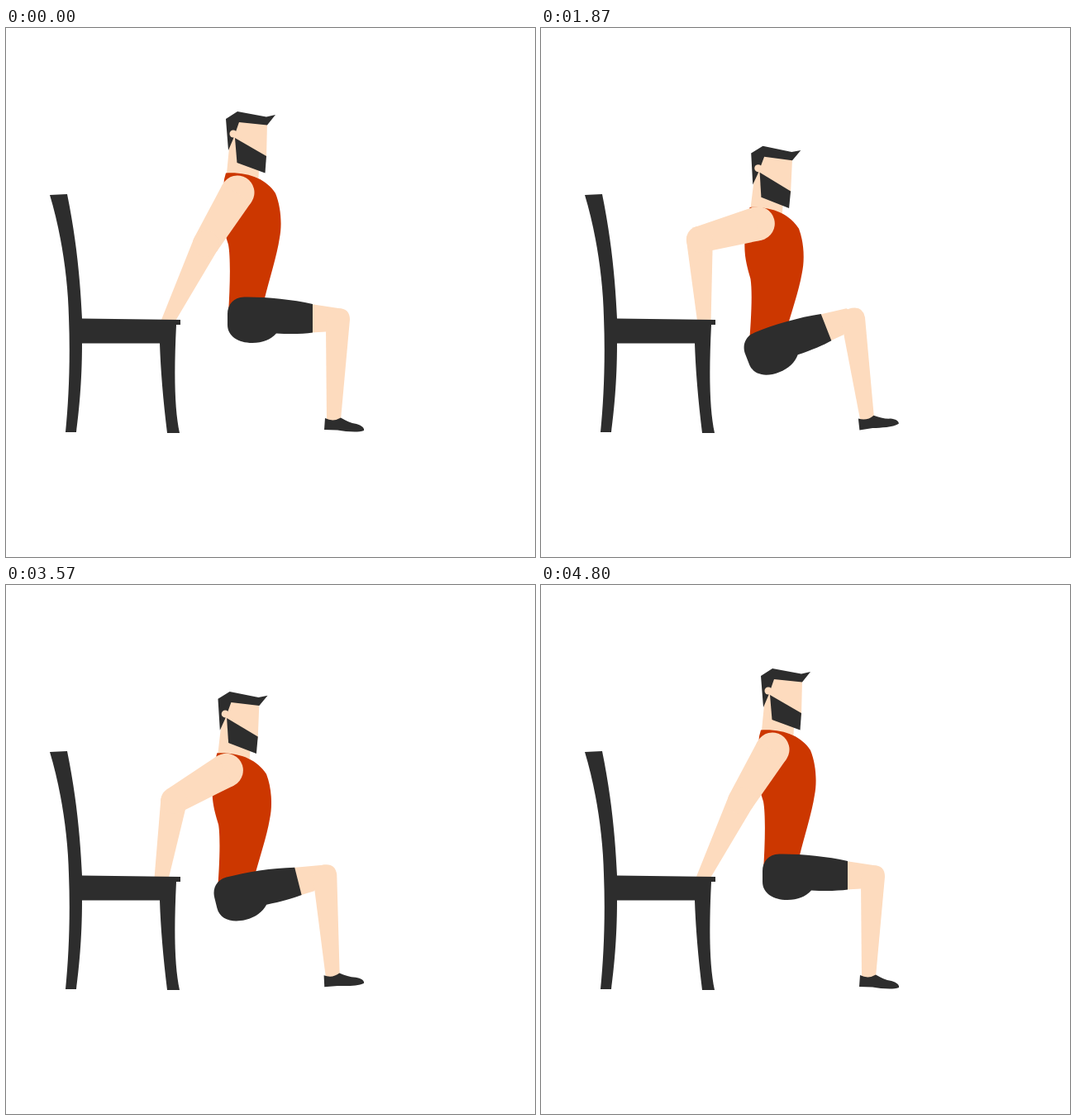
Recreate the animation shown at these times as an HTML page. Size 640 by 640 pixels, loop 4830 ms.

```html
<!DOCTYPE html>
<html lang="en">
<head>
<meta charset="utf-8">
<title>Chair dips</title>
<style>
  html, body { margin: 0; height: 100%; overflow: hidden; background: #fff; }
  svg { display: block; width: 100%; height: 100%; }
  .dark { fill: #2d2d2d; }
  .skin { fill: #fddbbe; }
  .shirt { fill: #cc3700; }
</style>
</head>
<body>
<svg viewBox="0 0 640 640">
  <g id="body">
    <path class="skin" d="M275 112L316 115L315 158L306 172L305 190L267 190L267 176L270 145Z"/>
    <path class="shirt" d="M266 175.500C294 174 315 183 326 200C333 217 334 239 331 254C328 275 318 306 313 327L310 346H269C271 315 272 278 269 262C265 249 260 235 261 215L264 183Z"/>
    <path class="dark" d="M266 110L280 101L315 107.500L326 105L316 117.500L282 114L275 134L269 148Z"/>
    <circle class="skin" cx="275" cy="128" r="4.500"/>
    <path class="dark" d="M277 133L315 155L313.500 175.500L279.500 163Z"/>
  </g>
  <g id="forearm" class="skin">
    <path d="M-16 0L-7.700 106H7.700L16 0Z"/>
  </g>
  <g id="upperArm" class="skin">
    <circle r="20.500"/>
    <path d="M1 -20.500L74 -16V16L1 20.500Z"/>
    <circle cx="73" r="16"/>
  </g>
  <path class="dark" d="M53 202L74 201C86 260 90 310 92 351.500L211 353V359H206C203 420 204 462 210 490H195C190 450 187 412 186 381.500H92C92 430 88 465 85 489H72C76 450 78 400 76 350C75 300 66 245 53 202Z"/>
  <g id="thigh">
    <path class="skin" d="M369 334L402 339L410 348L387 367.500L369 368.500Z"/>
    <path class="dark" d="M371 334C345 328 312 325 288 325.500C275 326 268 335 268 346V359C268 373 281 381 298 381C311 381 320 377 327 369.500C345 370.500 360 370 371 368.500Z"/>
  </g>
  <g id="calf">
    <path class="skin" d="M416 353L405 474Q396 479 388 474L387 360Q388 339 402 339Q416 339 416 353Z"/>
    <path class="dark" d="M386 472Q396 477 405 471.500C411 475 417 478 424 479C430 480.500 434 484 433 487C425 490 411 488 401 486.500L385 486Z"/>
  </g>
</svg>
<script>
const LOOP = 4830, HALF = 2400, UPPER_ARM = 73;
const part = id => document.getElementById(id);
const [body, forearm, upperArm, thigh, calf] =
  ["body", "forearm", "upperArm", "thigh", "calf"].map(part);

// Move a part so its pivot shifts by (dx, dy), then turn it around that pivot.
function pose(el, x, y, dx, dy, angle) {
  el.setAttribute("transform",
    `translate(${dx} ${dy}) rotate(${angle} ${x} ${y})`);
}

function draw(now) {
  const t = now % LOOP;
  const p = Math.max(0, 1 - Math.abs(t / HALF - 1)); // depth of the dip
  const arc = (a, b) => a * p - b * p * p;

  pose(body, 290, 340, -arc(32.5, 13), arc(57.3, 4.5), 1.8 * p);
  pose(thigh, 371, 351, -arc(36.4, 3.8), 13.9 * p, -27.5 * p);
  pose(calf, 388, 484, 0, 0, -13.3 * p);

  const sx = 280 - arc(34, 14.5), sy = 199 + arc(51, 3.5);
  const lift = 58.5 - 55.5 * p, a = lift * Math.PI / 180;
  pose(upperArm, 0, 0, sx, sy, 180 - lift);

  // The forearm leads on the way down and swings evenly on the way up.
  const lead = t < HALF ? 20 * p * (1 - p) : 0;
  pose(forearm, 0, 0, sx - UPPER_ARM * Math.cos(a), sy + UPPER_ARM * Math.sin(a),
    26.3 - 33.4 * p - lead);
}

const start = performance.now();
function tick() {
  draw(performance.now() - start);
  requestAnimationFrame(tick);
}
tick();
</script>
</body>
</html>
```
